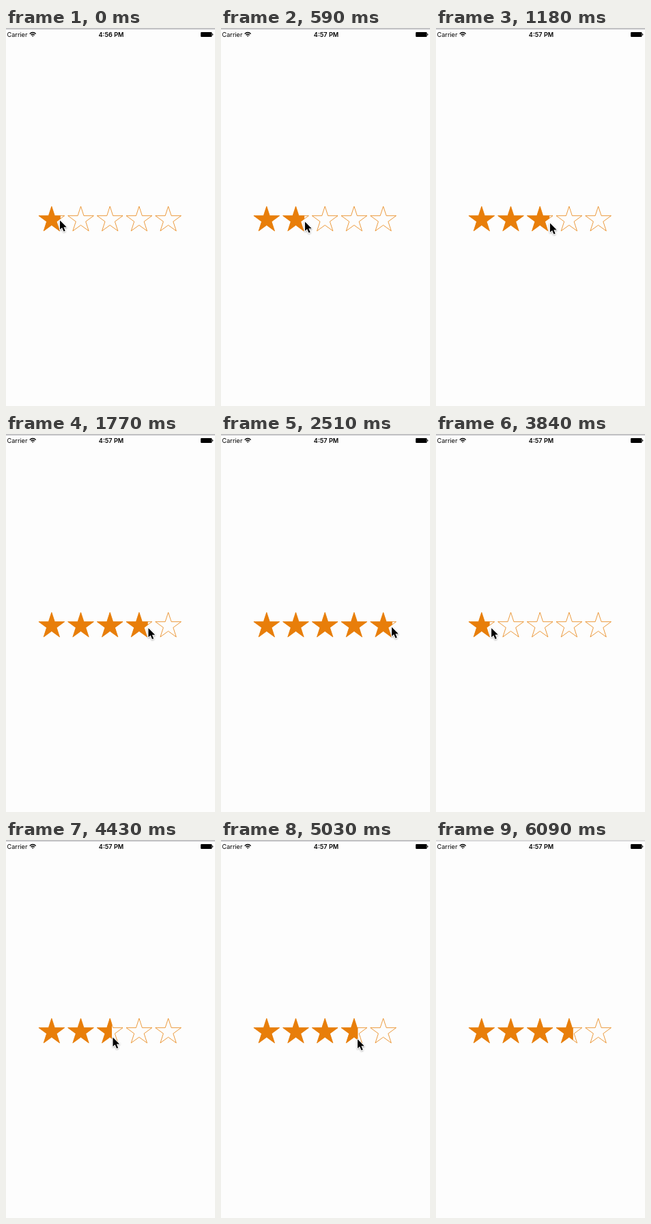
Animation, 306 px wide and 551 px high, one loop 6150 ms. Source, as an HTML page:

```html
<!DOCTYPE html>
<html lang="en">
<head>
<meta charset="utf-8">
<title>Star rating</title>
<style>
  html, body { margin: 0; width: 100%; height: 100%; overflow: hidden; background: #fdfdfd; }
  svg { display: block; width: 100%; height: 100%; }
  text { font: 9.1px Inter, "Liberation Sans", sans-serif; }
  #clock { font-weight: 600; text-anchor: middle; }
</style>
</head>
<body>
<svg viewBox="0 0 306 551">
  <defs>
    <clipPath id="rated"><rect id="level" y="250" height="60"/></clipPath>
    <filter id="shadow" x="-50%" y="-50%" width="200%" height="200%">
      <feDropShadow dx="0" dy=".8" stdDeviation=".8" flood-opacity=".4"/>
    </filter>
  </defs>

  <g id="edge"><rect width="306" height="1" fill="#cdcdcd"/><rect y="1" width="306" height="1" fill="#b4b4b8"/></g>

  <text x="1.6" y="13">Carrier</text>
  <g fill="none" stroke="#000" stroke-width="1.4">
    <path d="M34.7 8.5Q39.2 4.6 43.7 8.5M36.5 10.3Q39.2 8 41.9 10.3"/>
    <path d="M37.9 11.4Q39.2 10.4 40.5 11.4L39.2 12.8Z" fill="#000" stroke="none"/>
  </g>
  <text id="clock" x="154" y="13"></text>
  <rect x="285" y="6" width="16.5" height="7" rx="1.3"/>
  <path d="M302.1 8.1Q303.3 8.3 303.3 9.5T302.1 10.9Z"/>

  <path id="empty" fill="none" stroke="#e8820f" stroke-width=".8"/>
  <path id="filled" fill="#e87e0a" clip-path="url(#rated)"/>

  <path id="cursor" filter="url(#shadow)" stroke="#fff" stroke-width="1.6" paint-order="stroke" stroke-linejoin="round"
    d="M0 .5V13.8L3.1 11L5.5 16.6L7.7 15.7L5.4 10.2H9.7Z"/>
</svg>
<script>
const LOOP = 6150, STEP = 147.7;
const DRAG_END = 34, GONE = 39;
const el = id => document.getElementById(id);

// Turning points of the pointer; power > 1 slows down on arrival.
const stops = [
  { step: 0, x: 79, y: 280 },
  { step: 8, x: 167, y: 284, power: 1 },
  { step: 16, x: 250, y: 281, power: 1 },
  { step: 17, x: 250, y: 281, power: 1 },
  { step: 25, x: 59, y: 281, power: 2 },
  { step: DRAG_END, x: 200, y: 290, power: 1.45 },
  { step: 35, x: 200, y: 290, power: 1 },
  { step: GONE, x: 260, y: 590, power: 1 }
];

function pointerAt(step) {
  const i = Math.max(1, stops.findIndex(s => s.step >= step));
  const from = stops[i - 1], to = stops[i];
  const progress = Math.max(0, (step - from.step) / (to.step - from.step));
  const k = 1 - (1 - progress) ** to.power;
  return { x: from.x + (to.x - from.x) * k, y: from.y + (to.y - from.y) * k };
}

function starPath(cx, cy, outer, inner) {
  const points = Array.from({ length: 10 }, (_, i) => {
    const r = i % 2 ? inner : outer, angle = i * Math.PI / 5;
    return `${cx + r * Math.sin(angle)} ${cy - r * Math.cos(angle)}`;
  });
  return `M${points.join("L")}Z`;
}

function starRow(outer, inner) {
  return Array.from({ length: 5 }, (_, i) => starPath(66.8 + i * 42.7, 279.8, outer, inner)).join("");
}

el("empty").setAttribute("d", starRow(19.8, 7.6));
el("filled").setAttribute("d", starRow(20.3, 7.8));

function draw(now) {
  const t = now % LOOP;
  const step = Math.min(GONE, Math.floor((t + 5) / STEP));
  const { x, y } = pointerAt(step);
  // The rating trails slightly behind the pointer while dragging.
  const rated = pointerAt(Math.min(step - 0.15, DRAG_END)).x + 0.8;
  el("cursor").setAttribute("transform", `translate(${x} ${y})`);
  el("cursor").style.display = step < GONE ? "" : "none";
  el("level").setAttribute("width", rated);
  el("clock").textContent = step < 4 ? "4:56 PM" : "4:57 PM";
  el("edge").style.opacity = t < 6090 ? 1 : 0.6;
  requestAnimationFrame(draw);
}
draw(performance.now());
</script>
</body>
</html>
```
